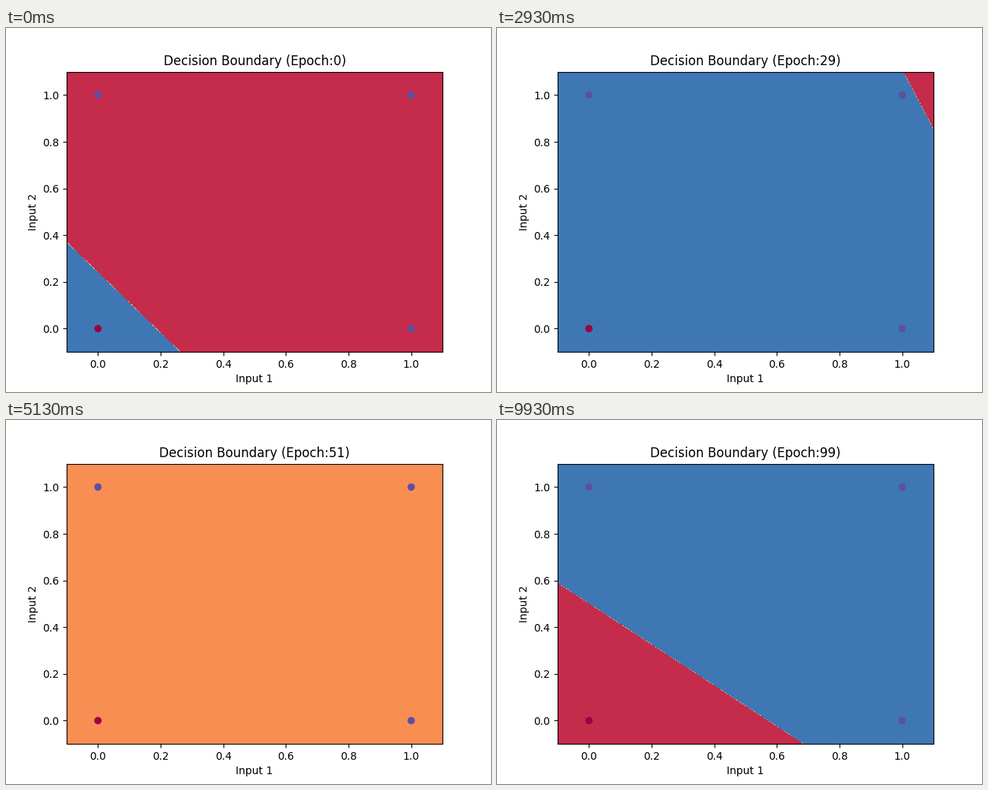
A matplotlib script for the animation above (9990 ms loop, 640 by 480 pixels).

```python
import numpy as np
import matplotlib
import matplotlib.pyplot as plt
from matplotlib.animation import FuncAnimation

LOOP, STEP = 9990, 30          # ms
EPOCHS = 100
LO, HI, CELL = -0.1, 1.1, 0.001
BAND = 0.15                    # contour level spacing

X = np.array([[0, 0], [0, 1], [1, 0], [1, 1]])
Y = np.array([0, 1, 1, 1])
SPECTRAL = matplotlib.colormaps["Spectral"]

fig = plt.figure(figsize=(6.4, 4.8), dpi=100)
ax = fig.add_subplot()


# Batch-trained perceptron for OR; weights in units of the learning rate.
def train():
    w, b = np.array([-40.093, -30.965]), 7.481
    states = []
    for _ in range(EPOCHS):
        states.append((w.copy(), b))
        err = Y - (X @ w + b > 0)
        w = w + err @ X
        b = b + err.sum()
    return states


# Data coordinates of the pixel centres that cover the axes.
box = ax.bbox
rows = np.arange(int(np.ceil(box.y1)) - 1, int(box.y0) - 1, -1)
cols = np.arange(round(box.x0), round(box.x1))


def to_data(px, start, size):
    return LO + (px - start) / size * (HI - LO)


def cell(v):
    pos = np.clip((v - LO) / CELL, 0, (HI - LO) / CELL - 1e-6)
    i = np.floor(pos)
    return LO + i * CELL, pos - i


gx, fx = cell(to_data(cols + 0.5, box.x0, box.width))
gy, fy = cell(to_data(rows + 0.5, box.y0, box.height))
fx, fy = fx[None, :], fy[:, None]

# Seven contour bands, then the colour of a one-class plane.
mids = (np.arange(7) + 0.5) / 7
palette = (SPECTRAL(np.append(mids, 0.25)) * 255).round().astype(np.uint8)


def bands(w, b):
    corners = [w[0] * x + w[1] * y + b for x in (LO, HI) for y in (LO, HI)]
    if min(corners) > 0 or max(corners) <= 0:
        return np.full((rows.size, cols.size), 7, np.uint8)

    def hit(dx, dy):
        return (w[0] * (gx + dx)[None, :] + w[1] * (gy + dy)[:, None] + b) > 0

    low = hit(0, 0) * (1 - fx) + hit(CELL, 0) * fx
    high = hit(0, CELL) * (1 - fx) + hit(CELL, CELL) * fx
    z = low * (1 - fy) + high * fy
    return np.clip(np.ceil(z / BAND) - 1, 0, 6).astype(np.uint8)


planes = [bands(w, b) for w, b in train()]

# Every tenth epoch arrives 30 ms early.
starts = np.array([100 * n + (30 if n % 10 else 0) for n in range(EPOCHS)])

extent = (to_data(cols[0], box.x0, box.width),
          to_data(cols[-1] + 1, box.x0, box.width),
          to_data(rows[-1], box.y0, box.height),
          to_data(rows[0] + 1, box.y0, box.height))
plane = ax.imshow(palette[planes[0]], extent=extent, aspect="auto",
                  interpolation="nearest")
ax.scatter(X[:, 0], X[:, 1], c=Y, cmap=SPECTRAL)
ax.set_xlim(LO, HI)
ax.set_ylim(LO, HI)
ax.set_xlabel("Input 1")
ax.set_ylabel("Input 2")
title = ax.set_title("")


def draw(i):
    epoch = np.searchsorted(starts, (i + 1) * STEP - 1, side="right") - 1
    plane.set_data(palette[planes[epoch]])
    title.set_text(f"Decision Boundary (Epoch:{epoch})")
    return plane, title


anim = FuncAnimation(fig, draw, frames=LOOP // STEP, interval=STEP,
                     repeat=True, repeat_delay=0)
plt.show()
```
